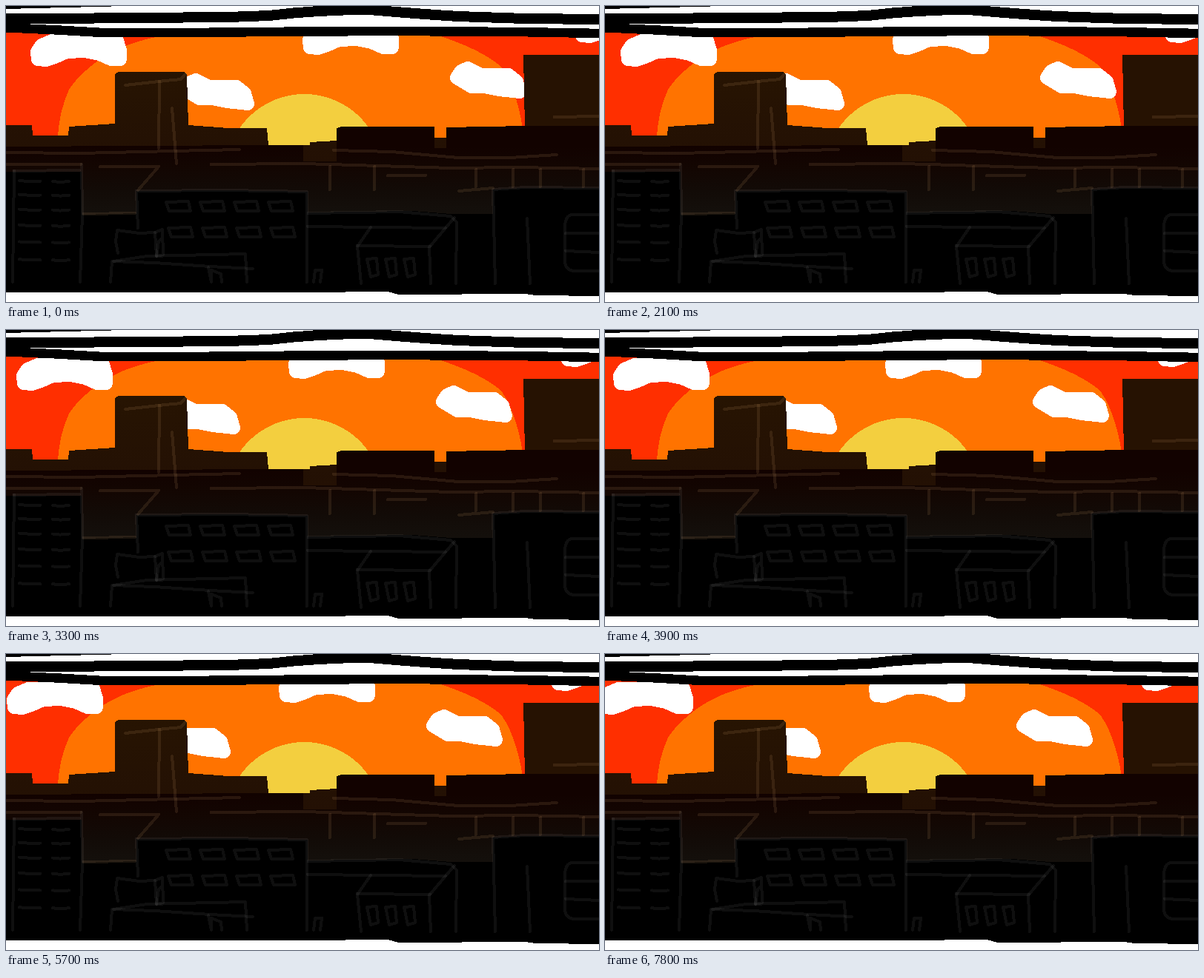
Animation, 800 px wide and 400 px high, one loop 8000 ms. Source, as an HTML page:

```html
<!DOCTYPE html>
<html lang="en">
<head>
<meta charset="utf-8">
<title>City sunset</title>
<style>
  html, body { margin: 0; width: 100%; height: 100%; overflow: hidden; background: #fff; }
  svg { display: block; width: 100%; height: 100%; shape-rendering: crispEdges; }
  .line { fill: none; stroke-width: 4; stroke-linecap: round; stroke-linejoin: round; }
  #warmInk { stroke: #ffc080; stroke-opacity: .1; }
  #coolInk { stroke: #fff; stroke-opacity: .06; }
  #clouds { fill: #fff; stroke: #fff; stroke-width: 18; stroke-linejoin: round; }
</style>
</head>
<body>
<svg viewBox="0 0 800 400">
  <defs>
    <clipPath id="view"><rect y="35" width="800" height="200"/></clipPath>
    <linearGradient id="farFill" gradientUnits="userSpaceOnUse" x1="0" y1="90" x2="0" y2="212">
      <stop offset="0" stop-color="#271402"/>
      <stop offset="1" stop-color="#231004"/>
    </linearGradient>
    <linearGradient id="midFill" gradientUnits="userSpaceOnUse" x1="0" y1="190" x2="0" y2="282">
      <stop offset="0" stop-color="#120200"/>
      <stop offset=".3" stop-color="#130602"/>
      <stop offset=".65" stop-color="#120b07"/>
      <stop offset="1" stop-color="#14100c"/>
    </linearGradient>
  </defs>

  <g clip-path="url(#view)">
    <rect width="800" height="240" fill="#ff2f00"/>
    <path fill="#ff7300" d="M70 200V175Q72 142 85 113Q95 97 115 81Q148 53 202 42L250 30H560L583 40Q640 58 668 82Q688 110 697 165V200Z"/>
    <circle cx="402.500" cy="225" r="106" fill="#f3cf3f"/>
    <g id="clouds"></g>
  </g>

  <!-- far skyline -->
  <path fill="url(#farFill)" d="M0 161H35L36 175H84L85 163L147 159V92L152 89H240L244 92L246 161L300 165H352L354 188H410V184L446 182V178H600V230H0Z"/>
  <path fill="#261202" d="M698 66H800V164H700Z"/>

  <!-- middle blocks -->
  <path fill="url(#midFill)" d="M0 190L354 188H401V210H446V165L452 163H578V192H594V164L700 162H800V300H0Z"/>

  <!-- front blocks -->
  <path d="M0 224H102V282L176 280V250L300 249L407 251V279L550 277L600 281H657V248L700 246H800V392L715 391L700 389L530 390L515 386H458V387H0Z"/>

  <g id="warmInk" class="line"></g>
  <g id="coolInk" class="line"></g>

  <!-- brushed upper border -->
  <g fill="none" stroke="#000">
    <path stroke-width="4" d="M0 2L162 -2"/>
    <path stroke-width="14" d="M0 17.500L300 15L355 13Q420 5 490 5Q560 11 610 14L700 17L800 18"/>
    <path stroke-width="12.500" d="M-5 29L70 32.500L130 36H250L400 34.500L530 34L690 35L800 37"/>
  </g>
</svg>
<script>
  const LOOP = 8000, STEP = 300, DRIFT = 44 / 26;
  const clouds = document.getElementById("clouds");

  function addPath(parent, d, transform = "") {
    const path = document.createElementNS("http://www.w3.org/2000/svg", "path");
    path.setAttribute("d", d);
    path.setAttribute("transform", transform);
    parent.append(path);
  }

  const pen = id => (...lines) =>
    lines.forEach(points => addPath(document.getElementById(id), "M" + points));
  const warm = pen("warmInk"), cool = pen("coolInk");

  // The same two clouds repeat up and to the right.
  const longCloud = "M43 72L42 62L48 53L62 47H150L154 60V72H142L126 65L106 61L82 62L66 69L54 73Z";
  const puffCloud = "M241 113L247 104L256 100L274 109H311L322 118L326 132L298 129L279 125H261Z";
  for (let i = 0; i < 3; i++) {
    const shift = `translate(${367 * i} ${-16 * i})`;
    addPath(clouds, longCloud, shift);
    addPath(clouds, puffCloud, shift);
  }

  // left high-rise, rooftops and far tower
  warm("161,107 215,101 236,99 242,92", "207,102 206,192", "224,138 230,213", "740,150 800,149",
    "0,198 100,199 225,196 315,194", "442,195 520,197 610,205 680,205 743,201",
    "0,214 101,214", "127,217 206,217 178,249",
    "277,214 400,213 470,215 600,219 690,218 800,220",
    "515,229 566,229", "611,250 657,246", "105,281 174,280");
  [437, 497].forEach(x => warm(`${x},217 ${x},248`));
  [634, 684, 721, 779].forEach(x => warm(`${x},221 ${x},244`));

  // left tower with rows of dashes
  cool("11,223 9,373", "11,223 99,222", "102,214 103,281 100,373");
  for (let i = 0; i < 6; i++) {
    const y = 237 + 18 * i + 0.65 * i * i;
    cool(`18,${y - 1} 30,${y} 46,${y}`, `63,${y} 73,${y + 1} 85,${y}`);
  }

  // office block with two rows of windows
  cool("178,300 176,250 300,249 406,251 406,373");
  for (let row = 0; row < 2; row++) {
    for (let col = 0; col < 4; col++) {
      const x = 216 + 46 * col + 3 * row, y = 265 + 35 * row;
      cool(`${x},${y} ${x + 30},${y - 1} ${x + 33},${y + 12} ${x + 4},${y + 12}Z`);
    }
  }

  // annex and doors
  cool("203,338 201,306 180,307 150,303 148,318 151,334",
    "201,306 211,302 212,336 203,338 206,318 211,313",
    "141,373 143,345 200,347 275,352 333,355", "145,345 190,338 323,335 325,373",
    "273,353 277,373 277,357 290,362 291,373", "415,373 417,357 426,357 424,373");

  // house
  cool("408,280 530,278 600,284 608,292 607,375",
    "407,298 593,300 605,286", "593,300 571,326 573,375",
    "492,299 474,325 479,375", "474,324 572,325");
  for (let x = 487; x < 550; x += 25) {
    cool(`${x},342 ${x + 13},341 ${x + 15},363 ${x + 5},366Z`);
  }

  // right tower
  cool("660,375 657,248 700,245 800,246", "703,287 707,375",
    "800,282H765Q754 282 754 300V347Q756 358 768 358H800",
    "755,307 800,307", "755,331 800,333");

  function draw(time) {
    const step = Math.floor((time % LOOP) / STEP);
    clouds.setAttribute("transform", `translate(${-Math.round(step * DRIFT)})`);
  }

  const start = performance.now();
  function tick() {
    draw(performance.now() - start);
    requestAnimationFrame(tick);
  }
  tick();
</script>
</body>
</html>
```
